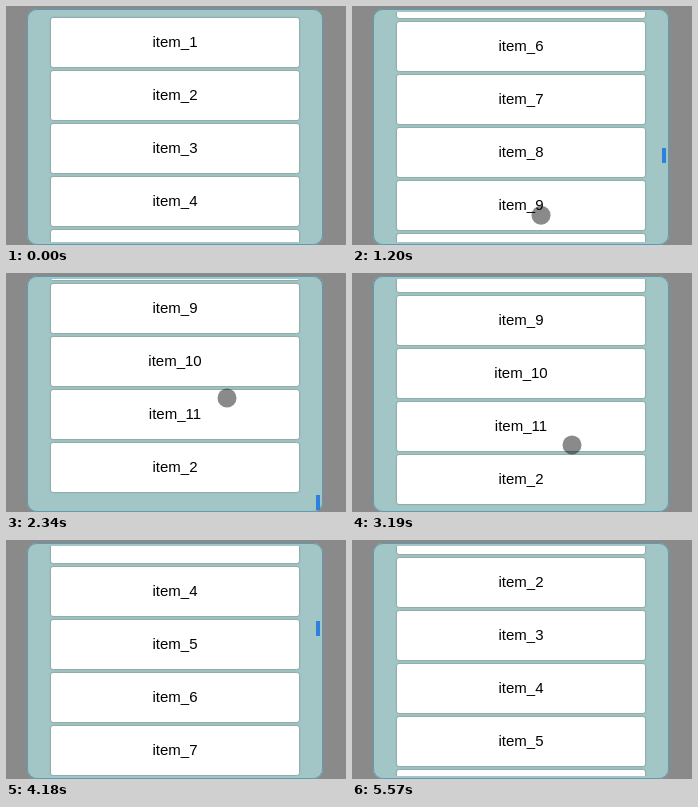
An HTML page with a canvas that plays this animation: 340 px wide and 239 px high, repeating every 6.48 s.

```html
<!DOCTYPE html>
<html lang="en">
<head>
<meta charset="utf-8">
<title>List scroll</title>
<style>
  html, body { margin: 0; width: 100%; height: 100%; overflow: hidden; background: #8b8a8b; }
  canvas { display: block; width: 340px; height: 239px; }
</style>
</head>
<body>
<canvas id="stage" width="340" height="239"></canvas>
<script>
const LOOP = 6480, STEP = 76.35, LEAD = 130;
const PITCH = 53, COUNT = 12, MAX_SCROLL = 413;
const ctx = document.getElementById('stage').getContext('2d');

const linear = p => p;
const outPow = n => p => 1 - Math.pow(1 - p, n);
const inOut = p => p * p * (3 - 2 * p);
const drag = p => Math.pow(p, 1.35);

// Each key: time, value(s), easing used on the way to it
const scrollKeys = [
  [520, [0]],
  [741, [167], drag],
  [1280, [263], outPow(2)],
  [1400, [263]],
  [1657, [272], inOut],
  [1900, [394], drag],
  [2115, [440], outPow(2)],
  [2344, [425], inOut],
  [2730, [413], outPow(2)],
  [3184, [413]],
  [5330, [47], outPow(2.14)]
];
const touchKeys = [
  [100, [147, 250]],
  [440, [150, 227], outPow(2)],
  [520, [150, 227]],
  [741, [158, 68], drag],
  [850, [160, 46], outPow(2)],
  [1280, [192, 226], inOut],
  [1400, [192, 226]],
  [1657, [193, 217], inOut],
  [1900, [212, 95], drag],
  [2100, [217, 92], outPow(2)],
  [2344, [221, 125], inOut],
  [2730, [221, 174], outPow(2)],
  [3100, [220, 172]],
  [3184, [220, 172]],
  [3420, [222, 256], linear]
];

function track(keys, t) {
  if (t <= keys[0][0]) return keys[0][1];
  for (let i = 1; i < keys.length; i++) {
    const [end, to, ease = linear] = keys[i];
    if (t > end) continue;
    const [start, from] = keys[i - 1];
    const p = ease((t - start) / (end - start));
    return from.map((v, j) => v + (to[j] - v) * p);
  }
  return keys[keys.length - 1][1];
}

function thumbAlpha(t) {
  if (t > 560 && t < 3030) return Math.min(1, (3030 - t) / 180);
  return t > 3200 && t < 5540 ? 1 : 0;
}

function box(x, y, w, h, r, fill) {
  ctx.beginPath();
  ctx.roundRect(x, y, w, h, r);
  ctx.fillStyle = fill;
  ctx.fill();
}

function drawPanel() {
  ctx.fillStyle = '#8b8a8b';
  ctx.fillRect(0, 0, 340, 239);
  box(21, 3, 296, 236, 10, '#a2c6c5');
  ctx.strokeStyle = '#5f9bb0';
  ctx.lineWidth = 1;
  ctx.beginPath();
  ctx.roundRect(21.5, 3.5, 295, 235, 9.5);
  ctx.stroke();
}

function drawItems(scroll) {
  ctx.save();
  ctx.beginPath();
  ctx.rect(24, 6, 290, 230);
  ctx.clip();
  ctx.font = '15px "Liberation Sans", Arial, sans-serif';
  ctx.textAlign = 'center';
  for (let i = 0; i < COUNT; i++) {
    const y = 12 + i * PITCH - scroll;
    if (y < -52 || y > 239) continue;
    ctx.shadowBlur = 2;
    ctx.shadowColor = 'rgba(0,0,0,.45)';
    box(45, y, 248, 49, 2, '#fff');
    ctx.shadowColor = 'transparent';
    ctx.fillStyle = '#000';
    ctx.fillText('item_' + (i < 11 ? i + 1 : 2), 169, y + 29);
  }
  ctx.restore();
}

function drawThumb(scroll, alpha) {
  const y = 6 + Math.min(scroll, MAX_SCROLL) / MAX_SCROLL * 216;
  ctx.globalAlpha = alpha;
  ctx.fillStyle = '#2f80dc';
  ctx.fillRect(310, Math.floor(y), 4, 15);
  ctx.globalAlpha = 1;
}

function drawTouch([x, y]) {
  ctx.beginPath();
  ctx.arc(x, y, 9.5, 0, Math.PI * 2);
  ctx.fillStyle = 'rgba(10,10,10,.48)';
  ctx.fill();
}

function render(ms) {
  // The picture advances in even steps
  const t = ms < LEAD ? 0 : LEAD + Math.floor((ms - LEAD + 6) / STEP) * STEP;
  const scroll = Math.round(track(scrollKeys, t)[0]);
  drawPanel();
  drawItems(scroll);
  drawThumb(scroll, thumbAlpha(t));
  drawTouch(track(touchKeys, t));
}

const begin = performance.now();
function tick() {
  render((performance.now() - begin) % LOOP);
  requestAnimationFrame(tick);
}
tick();
</script>
</body>
</html>
```
